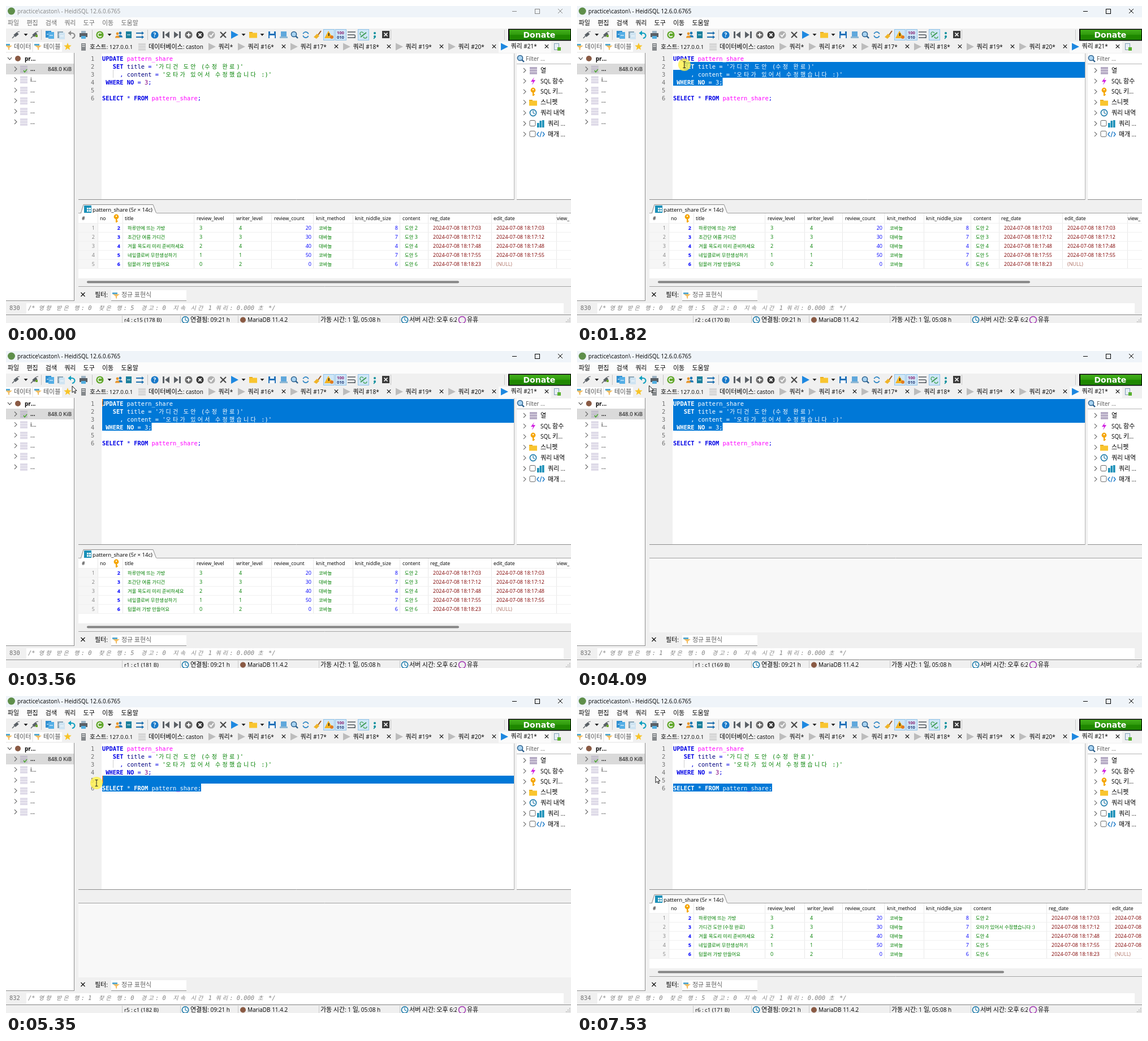
An HTML page with a canvas that plays this animation: 999 px wide and 561 px high, repeating every 8000 ms.

```html
<!DOCTYPE html>
<html lang="ko">
<head>
<meta charset="utf-8">
<title>SQL client</title>
<style>
html, body { margin: 0; width: 100%; height: 100%; overflow: hidden; background: #f0f0f0; }
canvas { display: block; }
</style>
</head>
<body>
<canvas id="stage" width="999" height="561"></canvas>
<script>
const c = document.getElementById('stage').getContext('2d');
const LOOP = 8000, COL = 6.25, LEFT = 170, TOP = 85, LINE = 14;
const KO = '"Noto Sans CJK KR", "Noto Sans CJK JP", sans-serif';
const GRAY = '#f0f0f0', BLUE = '#0078d7', INK = '#5a6066', GREEN = '#008000';

// ---- drawing helpers ----
function rect(x, y, w, h, color) { c.fillStyle = color; c.fillRect(x, y, w, h); }
function box(x, y, w, h, color) { c.strokeStyle = color; c.lineWidth = 1; c.strokeRect(x + .5, y + .5, w - 1, h - 1); }
function disc(x, y, r, color) { c.fillStyle = color; c.beginPath(); c.arc(x, y, r, 0, 7); c.fill(); }
function poly(color, ...p) {
  c.fillStyle = color;
  c.beginPath();
  for (let i = 0; i < p.length; i += 2) c.lineTo(p[i], p[i + 1]);
  c.fill();
}
function line(color, width, ...p) {
  c.strokeStyle = color; c.lineWidth = width;
  c.beginPath();
  for (let i = 0; i < p.length; i += 2) c.lineTo(p[i], p[i + 1]);
  c.stroke();
}
function arc(x, y, r, color, width = 1.5, a = 0, b = 7) {
  c.strokeStyle = color; c.lineWidth = width;
  c.beginPath(); c.arc(x, y, r, a, b); c.stroke();
}
function cross(x, y, r, color, width = 1.2) {
  line(color, width, x - r, y - r, x + r, y + r);
  line(color, width, x - r, y + r, x + r, y - r);
}
function down(x, y, color = '#222') { poly(color, x - 3.5, y - 2, x + 3.5, y - 2, x, y + 2); }
function chevron(x, y) { line('#666', 1.1, x - 2, y - 4, x + 2, y, x - 2, y + 4); }

// y is the middle of the text; Hangul runs get their own size
function text(s, x, y, color = '#000', size = 10, weight = '', ko = size * 1.1) {
  c.fillStyle = color;
  for (const run of s.match(/[가-힣]+|[^가-힣]+/g)) {
    c.font = /[가-힣]/.test(run) ? `${weight} ${ko}px ${KO}` : `${weight} ${size}px "Open Sans", sans-serif`;
    c.fillText(run, x, y + size * .37);
    x += c.measureText(run).width;
  }
}
function right(s, x, y, color, weight) {
  c.textAlign = 'right';
  text(s, x, y, color, 9, weight);
  c.textAlign = 'left';
}
const wide = ch => /[가-힣]/.test(ch) ? 2 : 1;
const cols = s => [...s].reduce((n, ch) => n + wide(ch), 0);
function mono(s, x, y, color, style = '') {
  c.fillStyle = color;
  for (const ch of s) {
    c.font = wide(ch) > 1 ? `${style} 10px ${KO}` : `${style} 10.4px "DejaVu Sans Mono", monospace`;
    c.fillText(ch, x, y + 3.8);
    x += wide(ch) * COL;
  }
}

// ---- small icons ----
function clock(x, y) { disc(x, y, 6, '#fff'); arc(x, y, 5.6, '#1878a8', 1.6); line('#1878a8', 1.2, x, y - 4, x, y, x + 3, y + 2); }
function key(x, y) { disc(x, y - 3, 4.4, '#f5a500'); disc(x, y - 4, 1.2, '#fff'); rect(x - 1, y, 2.4, 7, '#f5a500'); rect(x + 1, y + 4, 2, 1.5, '#f5a500'); }
function funnel(x, y) {
  rect(x - 6, y - 5, 9, 3, '#58a9cf');
  poly('#f2bd62', x - 5, y - 2, x + 7, y - 2, x + 2, y + 2, x + 2, y + 6, x, y + 5, x, y + 2);
}
function stack(x, y, color = '#dedae8') { for (let i = 0; i < 3; i++) rect(x - 6, y - 6 + i * 4.5, 13, 3.8, color); }
function lens(x, y) { disc(x, y, 4.6, '#a9d4f2'); arc(x, y, 4.6, '#2b5f8c'); line('#2b5f8c', 2.4, x + 3.4, y + 3.4, x + 7, y + 7); }
function folder(x, y) { rect(x - 7, y - 5, 6, 3, '#e3a51c'); rect(x - 7, y - 3.5, 14, 9, '#f9c52f'); }
function page(x, y, color) { rect(x - 5, y - 6, 10, 12, color); line('#fff', 1, x - 3, y, x + 3, y); }
function plug(x, y) { line(INK, 5, x - 3, y + 2, x + 3, y - 3); line(INK, 1.4, x - 7, y + 6, x - 3, y + 2); line(INK, 1.2, x + 2, y - 5, x + 6, y - 6); }
function user(x, y, color) { disc(x, y - 3, 2.4, color); c.fillStyle = color; c.beginPath(); c.arc(x, y + 4.5, 4, Math.PI, 0); c.fill(); }
function save(x, y, color) { rect(x - 6, y - 6, 13, 12, color); rect(x - 3, y - 6, 7, 4, '#e8f2fa'); rect(x - 4, y + 1, 9, 5, '#fff'); }
function round(x, y, color, mark) { disc(x, y, 6.6, color); mark && mark(x, y); }
const lightning = (x, y) => poly('#d020e0', x + 2, y - 7, x - 4, y + 1, x, y + 1, x - 2, y + 7, x + 4, y - 2, x, y - 2);

// ---- timeline ----
const path = [
  [70, 954, 474], [150, 952, 459], [420, 952, 459], [650, 760, 350], [850, 480, 230], [1020, 228, 140],
  [1160, 262, 136], [1630, 262, 136], [1820, 190, 104], [1960, 168, 92], [2160, 168, 92], [2360, 117, 62],
  [3560, 117, 62], [3690, 127, 61], [4090, 127, 61], [4300, 240, 85], [4520, 359, 150], [4670, 350, 163],
  [4810, 350, 163], [5000, 230, 160], [5150, 165, 157], [5290, 162, 156], [5350, 160, 154], [5450, 160, 154],
  [5550, 162, 162], [5820, 162, 162], [6080, 139, 142]
];
function mouse(t) {
  const i = path.findIndex(k => k[0] > t);
  if (i < 0) return path.at(-1).slice(1);
  if (!i) return path[0].slice(1);
  const [t0, x0, y0] = path[i - 1], [t1, x1, y1] = path[i];
  const k = (t - t0) / (t1 - t0);
  return [x0 + (x1 - x0) * k, y0 + (y1 - y0) * k];
}
const within = (t, ...spans) => spans.some(([a, b]) => t >= a && t < b);
const pressed = t => within(t, [1630, 2160], [4810, 5820]);
const caretOn = t => within(t, [1630, 2560], [3080, 4090], [4810, 6080], [6610, 7530]);

const KEY = '#0000e6', NAME = '#ff00ff', ID = '#000080';
const code = [
  [['UPDATE ', KEY, 1], ['pattern_share', NAME]],
  [['   SET ', KEY, 1], ['title ', ID], ['= ', KEY], ["'가디건 도안 (수정 완료)'", GREEN]],
  [['     , ', KEY], ['content ', ID], ['= ', KEY], ["'오타가 있어서 수정했습니다 :)'", GREEN]],
  [[' WHERE NO ', KEY, 1], ['= ', KEY], ['3', '#800080'], [';', KEY]],
  [],
  [['SELECT ', KEY, 1], ['* ', KEY], ['FROM ', KEY, 1], ['pattern_share', NAME], [';', KEY]]
];
const lengths = code.map(l => cols(l.map(p => p[0]).join('')));

// caret and anchor as [row, column], both from zero
function selection(t) {
  if (t < 1630) return { caret: [3, 14], anchor: [3, 14] };
  const first = t < 4810;
  const [x, y] = mouse(Math.min(t, first ? 2159 : 5819));
  const row = Math.max(0, Math.min(5, Math.floor((y - TOP) / LINE)));
  const col = Math.max(0, Math.min(lengths[row], Math.round((x - LEFT) / COL)));
  return { caret: [row, col], anchor: first ? [3, 14] : [5, 28] };
}
function bytes(t, row) {
  if (t < 1630) return 178;
  if (t < 3600) return row ? 170 : 181;
  if (t < 4810) return 169;
  return t < 6970 ? (row === 4 ? 182 : 169) : 171;
}

// ---- window parts ----
function titleBar(active) {
  const ink = active ? '#000' : '#858585';
  rect(0, 0, 999, 20, '#eff4f9');
  rect(0, 20, 999, 20, '#fcfcfc');
  disc(9.5, 9, 6.5, '#5f8f4b');
  text('practice\\caston\\ - HeidiSQL 12.6.0.6765', 20, 9, ink);
  line(ink, 1, 895, 9.5, 903, 9.5);
  box(935, 5, 9, 9, ink);
  cross(980, 9, 4, ink, 1);
  '파일 편집 검색 쿼리 도구 이동 도움말'.split(' ')
    .forEach((s, i) => text(s, 3 + i * 33.4, 30, active ? '#000' : '#6c6c6c'));
}

function toolbar(active) {
  const y = 51, white = '#fff';
  for (const x of [62, 152, 250, 680]) line('#c4c4c4', 1, x + .5, 42, x + .5, 60);
  for (const x of [35, 183, 420, 453]) down(x, y);
  plug(18, y); plug(51, y); rect(52, y, 4, 4, '#6ba52d');
  page(75, y - 1, '#2f8fd0'); page(80, y + 1, '#54aee6');
  page(96, y, '#8ba4b5'); page(99, y + 2, '#cfe4f2');
  const undo = active ? '#12a0c0' : '#8c8c8c';
  arc(117, y + 1.5, 4.5, undo, 2.2, -1.6, 1.6); line(undo, 2.2, 113, y - 3, 117, y - 3);
  poly(undo, 109.5, y - 3, 115, y - 7.5, 115, y + 1.5);
  rect(130, y - 3, 14, 7, INK); rect(133, y - 7, 8, 4, '#9fb4c4'); rect(133, y + 2, 8, 5, '#52aee0');
  round(166, y, '#62a82c'); arc(166, y, 3.4, white, 1.6, .6, 5.6);
  user(202, y, '#1f78b4'); user(197, y + 1, '#e8952b');
  page(217, y, '#1a7f9c');
  line('#1e6fae', 2, 230, y - 3, 242, y - 3); line('#1e6fae', 2, 230, y + 4, 242, y + 4);
  poly('#1e6fae', 240, y - 6, 244, y - 3, 240, y); poly('#1e6fae', 240, y + 1, 244, y + 4, 240, y + 7);
  round(263, y, '#1878c8'); text('?', 260.5, y, white, 10, 'bold');
  poly(INK, 289, y - 6, 281, y, 289, y + 6); rect(277, y - 6, 3, 12, INK);
  poly(INK, 297, y - 6, 305, y, 297, y + 6); rect(306, y - 6, 3, 12, INK);
  round(323, y, '#6c6c6c'); rect(319.5, y - 1, 7, 2, white); rect(322, y - 3.5, 2, 7, white);
  round(343, y, '#3a3a3a', (a, b) => cross(a, b, 2.6, white, 1.8));
  round(363, y, '#b0b0b0'); line(white, 1.8, 360, y, 362.5, y + 3, 367, y - 3);
  cross(384, y, 5, '#4a4a4a', 2.2);
  poly('#1e88e0', 398, y - 7, 411, y, 398, y + 7);
  folder(437, y); save(470, y, '#2472b8');
  rect(486, y - 6, 10, 9, '#5fa8dc'); rect(484, y + 3, 14, 3, '#8fb8d4');
  lens(509, y - 1);
  arc(530, y, 5, '#2f86c4', 1.8, .4, 2.9); arc(530, y, 5, '#2f86c4', 1.8, 3.5, 6);
  line('#a05a20', 2, 557, y - 7, 552, y); poly('#f0b428', 550, y - 2, 554, y + 2, 549, y + 7, 544, y + 4);
  for (const x of [561, 582, 622]) { rect(x, 41, 20, 20, '#cfe6f7'); box(x, 41, 20, 20, '#8fc3ea'); }
  poly('#f4b21e', 570, y - 7, 578, y + 6, 563, y + 6); rect(570, y - 3, 1.6, 5, '#222'); disc(576, y + 4, 3, '#e07a20');
  text('100', 585, 47, '#8a2070', 7.5, 'bold'); text('010', 585, 55.5, '#223a78', 7.5, 'bold');
  for (const d of [-5, 0, 5]) line(INK, 1.6, 604, y + d, d ? 618 : 615, y + d);
  arc(615, y + 2.5, 2.5, INK, 1.4, -1.6, 1.6);
  line('#3c9a50', 2, 627, y + 4, 637, y - 4); arc(629, y - 2, 3, '#4aa860', 1.4, 2, 6); arc(635, y + 3, 3, '#4aa860', 1.4, 0, 3);
  disc(652, y - 3, 2, '#0a8f9c'); disc(652, y + 3, 2, '#0a8f9c'); line('#0a8f9c', 1.6, 653, y + 4, 650, y + 7);
  rect(665, y - 7, 13, 13, '#3c3c3c'); cross(671.5, y - .5, 3, white, 1.6);
  line('#c8c8c8', 1, 881.5, 42, 881.5, 60);
  rect(888, 40.5, 111, 21, '#000');
  const g = c.createLinearGradient(0, 42, 0, 60);
  g.addColorStop(0, '#43b01c'); g.addColorStop(.5, '#2f9a0c');
  g.addColorStop(.5, '#1f8a00'); g.addColorStop(1, '#1f8400');
  rect(890, 42, 108, 18, g);
  c.fillStyle = '#fff'; c.font = 'bold 14px "DejaVu Sans", sans-serif'; c.fillText('Donate', 914.5, 56);
}

function tabs() {
  const y = 72;
  rect(0, 64, 46, 17, '#fff'); rect(48, 64, 51, 17, '#fff');
  funnel(4, y); text('데이터', 14, y, '#555'); funnel(56, y); text('테이블', 66, y, '#555');
  const star = [];
  for (let i = 0; i < 10; i++) {
    const r = i % 2 ? 3 : 7, a = i * Math.PI / 5 - Math.PI / 2;
    star.push(109 + r * Math.cos(a), y + r * Math.sin(a));
  }
  poly('#f8c428', ...star);
  rect(871, 63, 93, 20, '#fafafa');
  rect(133, 66, 8, 13, '#85898c'); rect(134.5, 68, 5, 1, '#fff'); rect(134.5, 71, 5, 1, '#fff');
  text('호스트: 127.0.0.1', 148, y, '#000', 9.8);
  stack(240, y, '#d6d6d6'); text('데이터베이스: caston', 252, y);
  for (let i = -1; i < 6; i++) {
    const x = i < 0 ? 358 : 410 + i * 93, on = i === 5;
    poly(on ? '#1e88e0' : '#bcbcbc', x, y - 6.5, x + 13, y, x, y + 6.5);
    text(i < 0 ? '쿼리*' : `쿼리 #${16 + i}*`, x + 17.5, y - on);
    if (i >= 0) cross(x + 81, y - .5, 3.2, '#111');
  }
  rect(969, 66, 9, 12, '#e6eef4'); box(969, 66, 9, 12, '#7d9db5'); rect(975, 73, 6, 6, '#58b02c');
}

function sidebar() {
  rect(0, 83, 121, 438, '#fff');
  line('#8c8c8c', 1, 120.5, 83, 120.5, 521);
  line('#8c8c8c', 1, 0, 521.5, 121, 521.5);
  line('#333', 1.1, 3, 91, 6.5, 95, 10, 91);
  disc(21, 93, 5, '#8a5a44');
  text('pr...', 33, 93, '#000', 10, 'bold');
  rect(0, 102, 120, 19, '#dadada');
  text('848.0 KiB', 74, 111.5, '#000', 9.7);
  for (let i = 0; i < 6; i++) {
    const y = 111.5 + i * 18.7;
    chevron(17, y); stack(31, y, i ? undefined : '#c4c0cc');
    text(i === 1 ? 'i...' : '...', 43, y, '#000', 10, i ? '' : 'bold');
  }
  line('#4aa82c', 1.5, 31, 114, 33, 117, 37, 112);
}

function helpers() {
  rect(903, 84, 96, 259, '#fff');
  lens(909, 92); text('Filter ...', 919, 93, '#555');
  line('#b4b4b4', 1, 903, 102.5, 999, 102.5);
  line('#8c8c8c', 1, 903, 342.5, 999, 342.5);
  ['열', 'SQL 함수', 'SQL 키...', '스니펫', '쿼리 내역', '쿼리 ...', '매개 ...'].forEach((s, i) => {
    const y = 114 + i * 18.8;
    chevron(917, y);
    text(s, i > 4 ? 958 : 945, y);
    if (i > 4) { c.beginPath(); c.roundRect(926, y - 5.5, 10, 10, 2); c.strokeStyle = '#666'; c.lineWidth = 1; c.stroke(); }
  });
  stack(932, 114, '#b5aac4'); lightning(932, 133); key(932, 152); folder(932, 171); clock(932, 189);
  [[939, 8], [943.5, 12], [948, 13]].forEach(([x, h]) => rect(x, 215 - h, 3.6, h, '#1a90b8'));
  line('#1878c8', 1.4, 942, 223, 939, 227, 942, 231); line('#1878c8', 1.4, 949, 223, 952, 227, 949, 231); line('#1878c8', 1.2, 947, 222, 944, 232);
}

function codeText(color) {
  code.forEach((parts, r) => {
    let x = LEFT;
    for (const [s, ink, bold] of parts) {
      mono(s, x, TOP + 8 + r * LINE, color || ink, bold ? 'bold' : '');
      x += cols(s) * COL;
    }
  });
}
function editor(t, { caret, anchor }) {
  rect(128, 84, 770, 258, '#fff');
  rect(128, 84, 41, 258, GRAY);
  line('#8c8c8c', 1, 128, 342.5, 899, 342.5);
  line('#b4b4b4', 1, 898.5, 84, 898.5, 343);
  for (let i = 0; i < 6; i++) mono(String(i + 1), 150, TOP + 8 + i * LINE, '#707070');
  line('#d0d0d0', 1, 189.5, 113, 189.5, 127);
  codeText();
  const [r0, c0] = caret, [r1, c1] = anchor;
  if (r0 !== r1 || c0 !== c1) {
    c.save();
    c.beginPath();
    for (let r = r0; r <= r1; r++) {
      const a = LEFT + (r === r0 ? c0 : 0) * COL, b = r === r1 ? LEFT + c1 * COL : 898;
      c.rect(a, TOP + r * LINE, b - a, LINE);
    }
    c.clip();
    rect(128, 84, 770, 258, BLUE);
    codeText('#fff');
    c.restore();
  }
  if (caretOn(t)) {
    c.globalCompositeOperation = 'difference';
    rect(LEFT + c0 * COL, TOP + r0 * LINE, 1.5, 13, '#fff');
    c.globalCompositeOperation = 'source-over';
  }
}

const rows = [
  ['하루만에 뜨는 가방', 3, 4, 20, '코바늘', 8, '18:17:03'],
  ['초간단 여름 가디건', 3, 3, 30, '대바늘', 7, '18:17:12'],
  ['겨울 목도리 미리 준비하세요', 2, 4, 40, '대바늘', 4, '18:17:48'],
  ['네잎클로버 무한생성하기', 1, 1, 50, '코바늘', 7, '18:17:55'],
  ['텀블러 가방 만들어요', 0, 2, 0, '코바늘', 6, '18:18:23']
];
function grid(edited) {
  const shift = edited ? 84 : 0, maroon = '#800000', num = '#0000ff';
  const cell = (s, x, y, color) => text(String(s), x, y, color, 9, '', 8.4);
  poly('#fafafa', 133, 367, 137, 352, 261, 352, 266, 367);
  line('#8c8c8c', 1, 132.5, 366, 137, 351.5, 260, 351.5, 265.5, 366);
  rect(138, 353, 13, 13, '#1a90b8');
  for (const x of [143, 147]) for (const y of [357, 361]) rect(x, y, 3, 3, '#fff');
  text('pattern_share (5r × 14c)', 153, 360, '#000', 9.6);
  rect(128, 367, 871, 115, '#fff');
  rect(128, 385, 34, 80, '#f6f6f6');
  rect(128, 482, 871, 15, GRAY);
  c.beginPath(); c.roundRect(143, 486.5, edited ? 612 : 658, 4, 2); c.fillStyle = '#858585'; c.fill();
  [162, 206, 332, 402, 469, 543, 613, 696, 746 + shift, 858 + shift, 973 + shift]
    .forEach(x => line('#e8e8e8', 1, x + .5, 367, x + .5, 465));
  for (let i = 0; i < 6; i++) line('#f0f0f0', 1, 128, 384.5 + i * 16, 999, 384.5 + i * 16);
  [['#', 134], ['no', 166], ['title', 210], ['review_level', 337], ['writer_level', 407], ['review_count', 474],
    ['knit_method', 548], ['knit_niddle_size', 617], ['content', 701], ['reg_date', 750 + shift],
    ['edit_date', 862 + shift], ['view_', 974 + shift]].forEach(([s, x]) => text(s, x, 376, '#000', 8.75));
  key(195, 376);
  rows.forEach(([title, review, writer, count, method, size, time], i) => {
    const y = 392.5 + i * 16, changed = edited && i === 1, date = '2024-07-08 ' + time;
    right(String(i + 1), 157, y, '#808080');
    right(String(i + 2), 202, y, num, 'bold');
    cell(changed ? '가디건 도안 (수정 완료)' : title, 215, y, GREEN);
    cell(review, 342, y, GREEN);
    cell(writer, 412, y, GREEN);
    right(String(count), 540, y, num);
    cell(method, 553, y, GREEN);
    right(String(size), 693, y, num);
    cell(changed ? '오타가 있어서 수정했습니다 :)' : `도안 ${i + 2}`, 705, y, GREEN);
    cell(date, 755 + shift, y, maroon);
    cell(i < 4 ? date : '(NULL)', 867 + shift, y, i < 4 ? maroon : '#b07468');
  });
}

function footer(t, [row, col]) {
  cross(136, 510.5, 3.5, '#111');
  text('필터:', 157, 511.5);
  rect(186, 503, 133, 19, '#fff'); line('#909090', 1, 186, 521.5, 319, 521.5);
  funnel(194, 512); text('정규 표현식', 204, 511.5, '#606060');
  rect(0, 526, 986, 19, '#fff'); rect(0, 526, 36, 19, GRAY);
  const step = t < 3600 ? 0 : t < 6970 ? 1 : 2;
  mono(String(830 + step * 2), 6, 534.5, '#707070');
  mono(`/* 영향 받은 행: ${[0, 1, 0][step]}  찾은 행: ${[5, 0, 5][step]}  경고: 0  지속 시간 1 쿼리: 0.000 초 */`,
    39, 534.5, '#808080', 'italic');
  line('#8c8c8c', 1, 0, 546.5, 999, 546.5);
  for (const x of [205, 308, 410, 553, 696]) line('#c8c8c8', 1, x + .5, 548, x + .5, 561);
  const y = 555.5;
  text(`r${row + 1} : c${col + 1} (${bytes(t, row)} B)`, 209, y, '#000', 9.7);
  clock(317, y); text('연결됨: 09:21 h', 326, y);
  disc(419, y, 5, '#8a5a44'); text('MariaDB 11.4.2', 427, y);
  text('가동 시간: 1 일, 05:08 h', 556, y);
  clock(705, y); text('서버 시간: 오후 6:2', 713, y);
  rect(797, 548, 20, 13, GRAY); arc(806.5, y, 6, '#a030b0', 1.5); text('유휴', 815, y);
  for (let i = 0; i < 3; i++) for (let j = 0; j <= i; j++) rect(996 - j * 3, 552 + i * 3, 1.5, 1.5, '#a8a8a8');
}

function pointer(t) {
  if (t < 70) return;
  const [x, y] = mouse(t), held = pressed(t);
  if (held) disc(x, y, 11, 'rgba(255,240,70,.8)');
  if (held || (x > LEFT && x < 898 && y > 84 && y < 342)) {
    line('#222', 1, x, y - 5, x, y + 5);
    line('#222', 1, x - 2.5, y - 5.5, x + 2.5, y - 5.5);
    line('#222', 1, x - 2.5, y + 5.5, x + 2.5, y + 5.5);
    return;
  }
  const p = [0, 0, 0, 11.5, 2.7, 9, 4.6, 13, 6.4, 12.2, 4.6, 8.4, 8, 8.2, 0, 0].map((v, i) => v + (i % 2 ? y : x));
  poly('#fff', ...p);
  line('#111', 1, ...p);
}

function draw(t) {
  const active = t >= 1630, sel = selection(t);
  rect(0, 0, 999, 561, GRAY);
  titleBar(active);
  toolbar(active);
  tabs();
  sidebar();
  helpers();
  editor(t, sel);
  rect(128, 367, 871, 131, '#f8f8f8');
  line('#a0a0a0', 1, 128, 366.5, 999, 366.5);
  if (t < 3600 || t >= 6970) {
    grid(t >= 6970);
    line('#a0a0a0', 1, 128, 496.5, 999, 496.5);
  }
  footer(t, sel.caret);
  pointer(t);
}

const start = performance.now();
(function frame() {
  draw((performance.now() - start) % LOOP);
  requestAnimationFrame(frame);
})();
</script>
</body>
</html>
```
